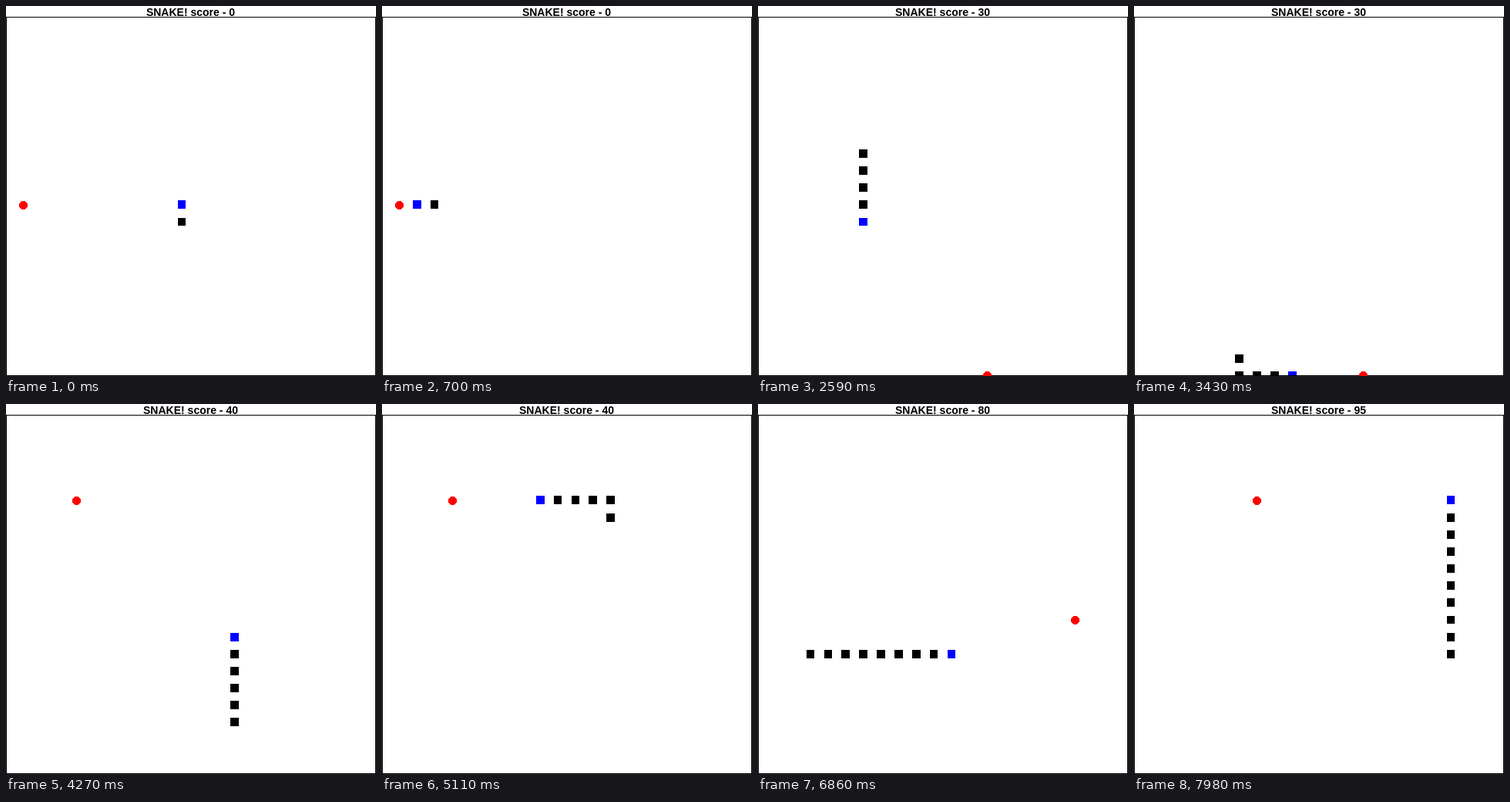
Animation of 480 by 480 pixels, one loop 8000 ms. Source, as an HTML page:

```html
<!DOCTYPE html>
<html lang="en">
<head>
<meta charset="utf-8">
<title>Snake</title>
<style>
  html, body { margin: 0; width: 100%; height: 100%; overflow: hidden; background: #fff; }
  svg { display: block; width: 480px; height: 480px; }
  text { font: bold 14px "Liberation Sans", Arial, sans-serif; font-kerning: none; text-anchor: middle; }
</style>
</head>
<body>
<svg viewBox="0 0 480 480" shape-rendering="crispEdges">
  <text id="title" x="239.5" y="13"></text>
  <path id="body"/>
  <path id="head" fill="#00f"/>
  <rect x=".5" y="14.5" width="479" height="465" fill="none" stroke="#000"/>
  <circle id="food" r="5.6" fill="#f00"/>
</svg>
<script>
const LOOP = 8000, STEP = 70;
const ROUTE = 'U1 L2 D1 L7 U8 R7 D3 L2 D15 R7 U16 L9 D3 L2 D6 R9 R7 U9';
const FOODS = [[1, 10], [8, 18], [6, 15], [13, 0], [4, 16], [2, 13], [11, 7], [18, 9], [7, 16]];
const MOVES = { U: [0, 1], D: [0, -1], L: [-1, 0], R: [1, 0] };
const [title, body, head, food] = ['title', 'body', 'head', 'food'].map(id => document.getElementById(id));

// Grid cells count from the lower left corner.
const px = col => col * 480 / 21;
const py = row => 479.3 - row * 22.15;

const trail = [[10, 9], [10, 10]];
const mealSteps = [];
for (const run of ROUTE.split(' ')) {
  const [dx, dy] = MOVES[run[0]];
  for (let i = 0; i < +run.slice(1); i++) {
    const [x, y] = trail[trail.length - 1];
    const cell = [x + dx, y + dy];
    trail.push(cell);
    if (String(cell) === String(FOODS[mealSteps.length])) mealSteps.push(trail.length - 2);
  }
}

function square([col, row]) {
  const left = Math.round(px(col) - 5.85), right = Math.round(px(col) + 4.87);
  const top = Math.round(py(row) - 5.43), bottom = Math.min(479, Math.round(py(row) + 5.53));
  return `M${left} ${top}H${right}V${bottom}H${left}Z`;
}

function draw(step) {
  const meals = mealSteps.filter(s => s <= step).length;
  const snake = trail.slice(step - meals, step + 2);
  head.setAttribute('d', square(snake.pop()));
  body.setAttribute('d', snake.map(square).join(''));
  const [col, row] = FOODS[meals];
  food.setAttribute('cx', Math.floor(px(col) - 0.1) + 0.5);
  food.setAttribute('cy', Math.floor(py(row) + 0.25) + 0.5);
  title.textContent = `SNAKE! score - ${10 * meals + 5 * Math.max(0, meals - 5)}`;
}

let start, shown;
function tick(now) {
  start ??= now;
  const step = Math.floor((now - start) % LOOP / STEP);
  if (step !== shown) draw(shown = step);
  requestAnimationFrame(tick);
}
draw(0);
requestAnimationFrame(tick);
</script>
</body>
</html>
```
